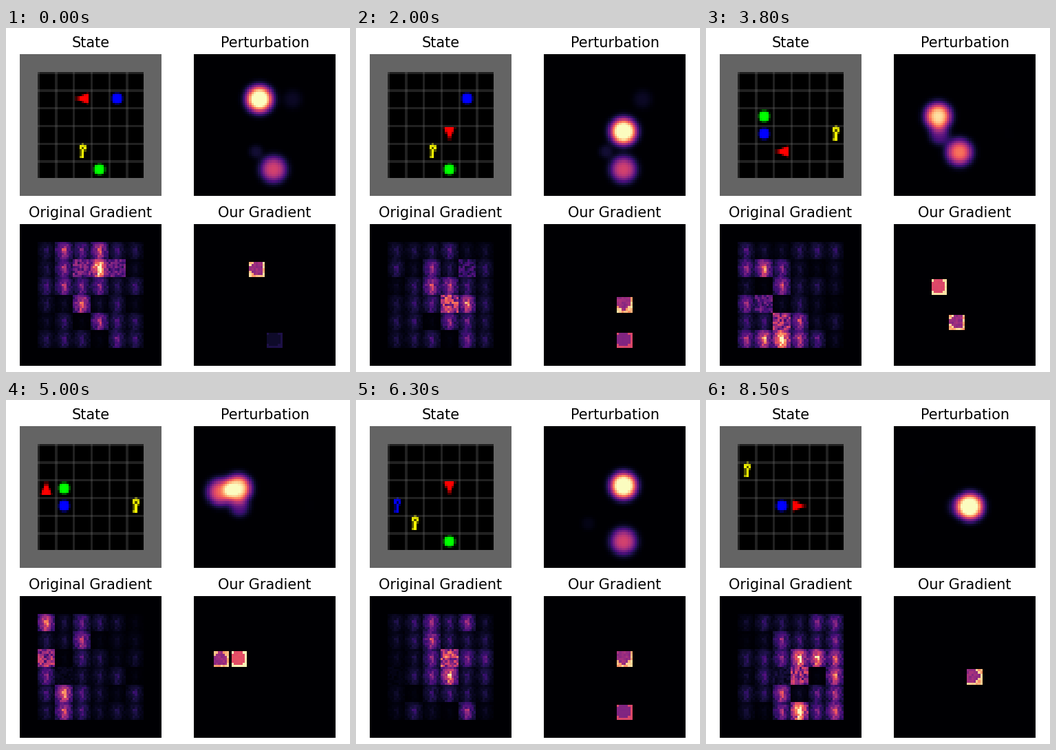
Recreate the animation shown at these times as a matplotlib script. Size 500 by 500 pixels, loop 8.8 s.

```python
import numpy as np
import matplotlib.pyplot as plt
from matplotlib.animation import FuncAnimation

STAGE, DPI = 500, 125
CELLS, TILE, SUB = 8, 8, 3
SIZE = CELLS * TILE
PANEL = 205.4
TICK = 100
TICKS = 88

RED, GREEN, BLUE, YELLOW = (255, 0, 0), (0, 255, 0), (0, 0, 255), (255, 255, 0)
GREY = (100, 100, 100)
HEADINGS = [(1, 0), (0, 1), (-1, 0), (0, -1)]  # right, down, left, up

# Each episode: start cell, heading, moves, goal ball, two distractors.
# Moves: L/R turn, F forward, P pick the goal up.
EPISODES = [
    dict(cell=(3, 2), heading=2, moves="LFFRLLFRFP", goal=(4, 6),
         blue=("ball", (5, 2)), key=(3, 5)),
    dict(cell=(4, 6), heading=2, moves="RFLFFFRFFRP", goal=(2, 3),
         blue=("ball", (2, 4)), key=(6, 4)),
    dict(cell=(4, 2), heading=0, moves="RFFFP", goal=(4, 6),
         blue=("key", (1, 4)), key=(2, 5)),
    dict(cell=(4, 6), heading=0, moves="LFFRP", goal=(5, 4),
         blue=("ball", (3, 4)), key=(1, 2)),
]

# Unit tile coordinates at the fine raster
fine = (np.arange(TILE * SUB) + .5) / (TILE * SUB)
U, V = np.meshgrid(fine, fine)


def rect(x0, x1, y0, y1):
    return (U >= x0) & (U <= x1) & (V >= y0) & (V <= y1)


def disc(x, y, r):
    return (U - x) ** 2 + (V - y) ** 2 <= r * r


def ball_mask():
    return disc(.5, .5, .31)


def key_mask():
    shape = rect(.50, .63, .31, .88) | rect(.38, .50, .59, .66)
    shape |= rect(.38, .50, .81, .88) | disc(.56, .28, .19)
    return shape & ~disc(.56, .28, .064)


def agent_mask(heading):
    dx, dy = HEADINGS[heading]
    along = .5 + (U - .5) * dx + (V - .5) * dy
    across = (V - .5) * dx - (U - .5) * dy
    return (along >= .12) & (np.abs(across) <= .31 * (.87 - along) / .75)


def shrink(a):
    return a.reshape(TILE, SUB, TILE, SUB, -1).mean(axis=(1, 3))


def tile_at(cell):
    c, r = cell
    return (slice(r * TILE, (r + 1) * TILE), slice(c * TILE, (c + 1) * TILE))


def draw_tile(mask=None, color=None):
    img = np.zeros((TILE * SUB, TILE * SUB, 3))
    img[rect(0, .031, 0, 1) | rect(0, 1, 0, .031)] = GREY
    if mask is not None:
        img[mask] = color
    return shrink(img)


def draw_state(s):
    img = np.full((SIZE, SIZE, 3), 100.)
    inner = slice(TILE, SIZE - TILE)
    img[inner, inner] = np.tile(draw_tile(), (CELLS - 2, CELLS - 2, 1))
    kind, cell = s["blue"]
    img[tile_at(cell)] = draw_tile(ball_mask() if kind == "ball" else key_mask(), BLUE)
    img[tile_at(s["key"])] = draw_tile(key_mask(), YELLOW)
    if not s["picked"]:
        img[tile_at(s["goal"])] = draw_tile(ball_mask(), GREEN)
    img[tile_at(s["cell"])] = draw_tile(agent_mask(s["heading"]), RED)
    return np.round(img).astype(np.uint8)


def centre(cell):
    return (cell[0] + .5) * TILE, (cell[1] + .5) * TILE


def blob(x, y, strength, width):
    px = np.arange(SIZE) + .5
    r = np.hypot(px[None, :] - x, px[:, None] - y)
    return strength * np.exp(-(r / width) ** 2.9)


def goal_bearing(s):
    """Whether the goal is ahead, and how far to the side (0..1) if so."""
    dx, dy = HEADINGS[s["heading"]]
    gx, gy = np.subtract(s["goal"], s["cell"])
    ahead = dx * gx + dy * gy >= 0
    side = abs(dx * gy - dy * gx) / np.hypot(gx, gy)
    return ahead, side if ahead else 0


def draw_blur(s):
    # the agent matters most when it goes straight, the goal when it must turn
    side = 0 if s["picked"] else goal_bearing(s)[1]
    dx, dy = HEADINGS[s["heading"]]
    x, y = centre(s["cell"])
    out = blob(x - 1.6 * dx, y - 1.4 * dy + .3, 1.2 - .55 * side, 5.8)
    if not s["picked"]:
        out += blob(*centre(s["goal"]), .57 + .41 * side, 5.8)

    # distractors matter near the goal
    def gap(cell):
        return np.hypot(*np.subtract(cell, s["goal"]))

    kind, cell = s["blue"]
    if kind == "ball":
        x, y = centre(cell)
        out += blob(x + .6, y + .4, .06 + .2 * np.exp(1 - gap(cell)), 4.5)
    out += blob(*centre(s["key"]), .4 * np.exp(-gap(s["key"])), 3.2)
    return np.clip(out, 0, 1)


def draw_sharp(s, rng):
    out = np.zeros((SIZE, SIZE))

    def stamp(cell, mask, strength, inner, rough):
        cover = shrink(mask.astype(float))[..., 0] > 0
        patch = strength * np.where(cover, inner, 1)
        patch *= 1 - rough * rng.random((TILE, TILE))
        patch[0] = patch[:, 0] = 0
        out[tile_at(cell)] = patch

    if not s["picked"]:
        ahead, side = goal_bearing(s)
        stamp(s["goal"], ball_mask(), .6 + .4 * side if ahead else .13, .63, .03)
    dx, dy = HEADINGS[s["heading"]]
    body = agent_mask(s["heading"]) | disc(.5 - .08 * dx, .5 - .08 * dy, .29)
    stamp(s["cell"], body, .95, .5, .2)
    return out


# Shared tile texture: bright in the middle, dim at the edges
mid = np.abs(np.arange(TILE) - 3.5)
GRAIN = np.outer(.65 + .45 * np.exp(-(mid / 2.5) ** 2),
                 .45 + .85 * np.exp(-(mid / 1.9) ** 2))
GRAIN = GRAIN * np.random.default_rng(5).uniform(.7, 1.25, (TILE, TILE))


def heat_map(s, rng):
    """Random warmth, gathered round the agent and down the goal's column."""
    rows, cols = np.mgrid[:CELLS, :CELLS]
    (ax, ay), gx = s["cell"], s["goal"][0]
    near = np.exp(-((cols - ax) / 1.3) ** 2 - ((rows - ay) / 2.2) ** 2)
    column = np.exp(-((cols - gx) / 1.2) ** 2)
    hot = (.8 * near + .45 * column) * rng.random(near.shape) ** 1.5
    heat = rng.uniform(.02, .13, near.shape) + .72 * hot / hot.max()
    for c, r in (s["goal"], s["key"]):
        heat[r, c] = .02
    heat[ay, ax] = rng.uniform(.35, .75)
    return heat


def draw_raw(s, rng):
    heat = heat_map(s, rng)
    out = np.zeros((SIZE, SIZE))
    for row in range(1, CELLS - 1):
        for col in range(1, CELLS - 1):
            if (col, row) in (s["cell"], s["blue"][1]):
                grain = rng.uniform(.4, 1.3, (TILE, TILE))
            else:
                grain = GRAIN * rng.uniform(.85, 1.15, (TILE, TILE))
            out[tile_at((col, row))] = heat[row, col] * grain
    return out


def walk():
    """Every step of all episodes in order."""
    for ep in EPISODES:
        (x, y), heading = ep["cell"], ep["heading"]
        for move in " " + ep["moves"]:
            if move == "F":
                x, y = x + HEADINGS[heading][0], y + HEADINGS[heading][1]
            elif move in "LR":
                heading = (heading + (1 if move == "R" else -1)) % 4
            yield dict(ep, cell=(x, y), heading=heading, picked=move == "P")


def render(s, seed):
    rng = np.random.default_rng(seed)
    return draw_state(s), draw_blur(s), draw_raw(s, rng), draw_sharp(s, rng)


shots = [render(s, 100 + i) for i, s in enumerate(walk())]

plt.rcParams["font.family"] = "DejaVu Sans"
fig = plt.figure(figsize=(STAGE / DPI, STAGE / DPI), dpi=DPI, facecolor="white")


def add_panel(title, x, y, data):
    ax = fig.add_axes([x / STAGE, 1 - (y + PANEL) / STAGE, PANEL / STAGE, PANEL / STAGE])
    ax.set_title(title, fontsize=12)
    ax.axis("off")
    return ax.imshow(data, cmap="magma", vmin=0, vmax=1, interpolation="nearest")


titles = ["State", "Perturbation", "Original Gradient", "Our Gradient"]
corners = [(x, y) for y in (38.4, 285.4) for x in (20, 273.3)]
images = [add_panel(t, x, y, d) for t, (x, y), d in zip(titles, corners, shots[0])]


def update(tick):
    # steps last 300 and 200 ms in turn
    step = 2 * (tick // 5) + (tick % 5 >= 3)
    for image, data in zip(images, shots[step]):
        image.set_data(data)
    return images


anim = FuncAnimation(fig, update, frames=TICKS, interval=TICK, repeat=True, blit=False)
plt.show()
```
